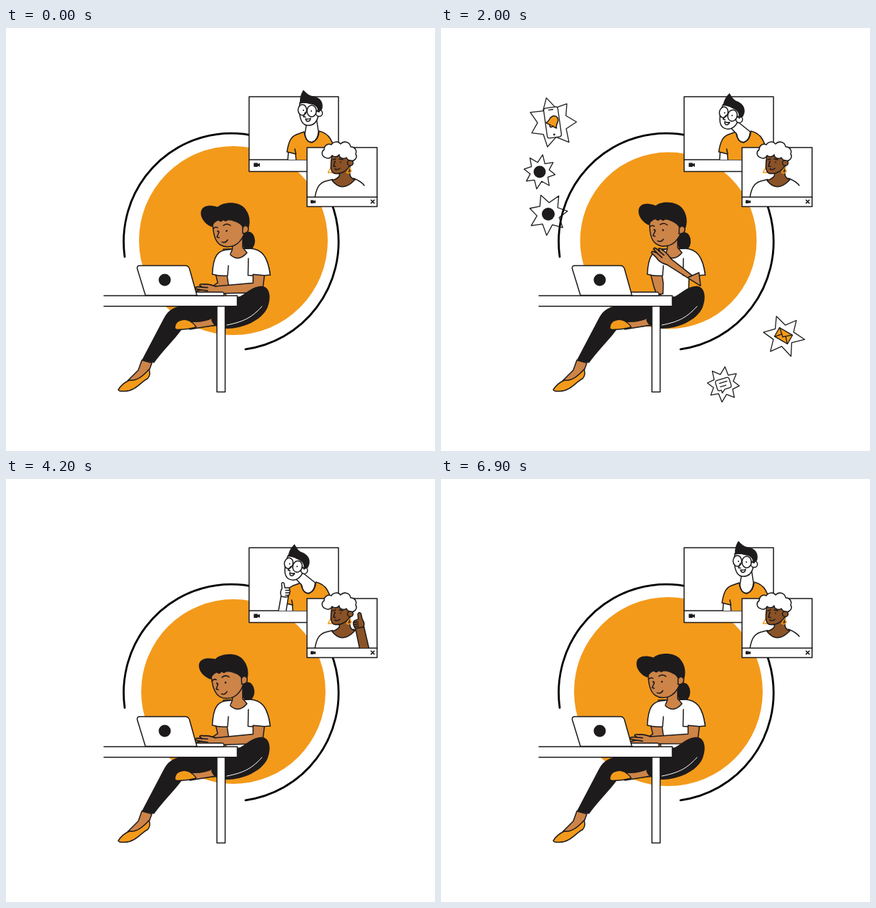
An HTML page for the animation above (7000 ms loop, 600 by 591 pixels).

```html
<!DOCTYPE html>
<html lang="en">
<head>
<meta charset="utf-8">
<title>Video call at the desk</title>
<style>
  html, body { margin: 0; width: 100%; height: 100%; overflow: hidden; background: #fff; }
  svg { display: block; width: 100vw; height: 100vh; }
  .ink { fill: #1d1b1c; stroke: none; }
  .skin { fill: #cd8448; }
  .brown { fill: #8a5227; }
  .orange { fill: #f39a1b; }
  .line { fill: none; }
</style>
</head>
<body>
<svg viewBox="0 0 600 591" fill="#fff" stroke="#1d1b1c" stroke-width="1.5" stroke-linecap="round" stroke-linejoin="round">
  <defs>
    <clipPath id="bigView"><rect x="340" y="80" width="125" height="104"/></clipPath>
    <clipPath id="smallView"><rect x="421" y="150" width="98" height="86"/></clipPath>
  </defs>

  <g id="stars" stroke-width="1.300"></g>
  <circle id="disc" class="orange" cx="318" cy="297" r="132" stroke="none"/>
  <path class="line" d="M166 319.500A150.300 151.500 0 1 1 335 448.800" stroke="#000" stroke-width="2.800"/>

  <!-- large call window -->
  <rect x="340" y="96" width="125" height="104.500"/>
  <path d="M340 184H465"/>
  <path class="ink" d="M346.500 188.500h5.500v1.500l3-1.300v5.200l-3-1.300v1.400h-5.500z"/>
  <g clip-path="url(#bigView)">
    <g id="manBody">
      <path d="M395 172L394 187H407L406 172Z"/>
      <path class="orange" d="M393 173C395 160 398 152 406 149L417 145Q419 160 428 160Q437 157 438 144C451 147 459 156 462 187H406L405 176Z"/>
      <path class="line" d="M405.500 176L404 169"/>
    </g>
    <path id="manNeck"/>
    <g id="manHead">
      <path d="M411 104C409 118 411 135 421 136C430 137 435 131 437 122L440 105Z"/>
      <circle cx="438" cy="119" r="4.600"/>
      <path class="ink" d="M411.500 106C410 98 413 91 416 86.500C420 91 424 94.500 428 95C440 96 445 105 442 114L437 118C436 109 431 107 424 106Q417 103 411.500 106Z"/>
      <ellipse cx="414.500" cy="114.500" rx="6" ry="7.500"/>
      <ellipse cx="427.500" cy="116" rx="6.500" ry="8"/>
      <path class="line" d="M434 116l4 1M418.500 118l-2.500 6 3 .5M419 127q4 1 7-1q-1 5-4.500 4.500q-2-1-2.500-3.500"/>
      <circle class="ink" cx="416" cy="115" r="1"/><circle class="ink" cx="427" cy="116" r="1"/>
    </g>
    <g id="manHand">
      <path stroke="none" d="M380 150L373 190H384L390 152Z"/>
      <path class="line" d="M380 150L373 190M390 152L384 190"/>
      <path d="M380 152C378 147 379 144 381 141L380.500 134Q382 131 384 134L385 140H390Q393 141 391 143.500Q394 145 391 147Q393 149 390 150.500Q390 153 386 153Z"/>
      <path class="line" d="M386 143.500h5M386 147h5M386 150.500h4"/>
    </g>
  </g>

  <!-- small call window -->
  <rect x="421" y="167" width="98" height="82.500"/>
  <path d="M421 236.300H519"/>
  <path class="ink" d="M426 240.500h4.500v1.200l2.500-1v4.200l-2.500-1v1h-4.500z"/>
  <path d="M510.700 240.500l4.200 4.200m0-4.200l-4.200 4.200" stroke-width="1.700"/>
  <g clip-path="url(#smallView)">
    <path class="line" d="M457 211.500L447 214C437 217 434 225 432 237M486 210C494 213 498 216 501 220"/>
    <path class="brown" d="M467 200L466 207Q463 211 456 213Q470 231 488 212Q482 210 481 205V192Z"/>
    <g id="galHead">
      <path class="line" stroke="#f39a1b" d="M455 193L450.500 202H457.500ZM480 194L476.500 202Q481 204 483 200Z"/>
      <path class="brown" d="M456 177C453 195 454 203 461 203.500C470 204 478 199 482 190V176Z"/>
      <circle class="brown" cx="481.500" cy="188.500" r="4"/>
      <path d="M447 181a6 6 0 0 1-2-11a7 7 0 0 1 10-7a8 8 0 0 1 13-1a8 8 0 0 1 14 4a7 7 0 0 1 7 10a6 6 0 0 1-7 9q-4 0-6-4a6 5 0 0 1-10-4a6 5 0 0 1-10 1a6 6 0 0 1-9 3z"/>
      <path class="line" d="M457 184l4-1M466 183l5 1M460 186l-2 7 3 .5M460 197q4 2 7-1"/>
      <circle class="ink" cx="460" cy="187" r=".9"/><circle class="ink" cx="468" cy="187.500" r=".9"/>
    </g>
    <g id="galHand" class="brown">
      <path d="M499 200L501 240H514L511 197Z"/>
      <path d="M499 201C496 196 497 191 500 190L505 189L505.500 182Q508 178 510 182L510.500 190C513 195 512 199 510 201Z"/>
      <path class="line" d="M498 192.500h6M497.500 195.500h6.500M498 198.500h6"/>
    </g>
  </g>

  <!-- woman at the desk -->
  <path class="ink" d="M296 388H246C232 390 225 397 220 407L190 464L207 468C220 450 235 436 246 421L296 416Z"/>
  <path class="skin" d="M190 464L185 478L170 493L182 494L200 479L204 468Z"/>
  <path class="orange" d="M157 505.500C162 497 168 494 173 492C182 494 191 487 200 477Q203 484 198 490C190 493 182 507 166 507.500Q158 508 157 505.500Z"/>
  <path class="skin" d="M252 409Q272 413 291 404L294 415L257 421Z"/>
  <path class="orange" d="M236 419Q236 410 245 408Q252 406 258 410Q264 414 266 418Q256 421 240 421.500Q236 421 236 419Z"/>

  <g id="backHair"><ellipse class="ink" cx="339" cy="297.500" rx="9.300" ry="13"/></g>
  <path d="M304 309L341 308C356 309 366 317 369.500 345L347 346L346 376H308L302 340Z"/>
  <path class="skin" d="M317 298L316.500 309Q315 314 313 316Q325 328 337 314Q334 310 331 307V290Z"/>
  <path id="farArm" class="skin"/>
  <path id="farSleeve" d="M314 309.500C296 309 290 318 288.500 344Q299 347 310 346L311 332"/>
  <path d="M341 308C358 309 366 319 369.500 345Q355 347 338.500 345.500L339 322" stroke-linejoin="miter"/>
  <g id="head">
    <path class="skin" d="M289 268C289 284 291 298 300 303Q308 308 319 304Q328 300 333 288L334 268Z"/>
    <path class="skin" d="M331 279Q335 273 339 279Q340 287 331 287Z"/>
    <path class="ink" d="M288 278C280 275 272 267 272.500 258C273 249 283 246 296 250C303 243 325 241 334 252C341 260 342 271 339.500 279C336 275 334 274 331 279C327 271 319 271 311 267Q308 273 304 268Q301 273 297 269Q291 271 288 278Z"/>
    <path class="line" d="M290 280q3-3 6-1M304 276q5-4 10 0M298 285l-3 7 3 1M302 299q5 2 8-3"/>
    <circle class="ink" cx="296.500" cy="284" r="1.300"/><circle class="ink" cx="308.500" cy="283.500" r="1.300"/>
  </g>
  <path id="nearArm" class="skin"/>
  <g id="hand">
    <path class="skin" d="M-1-4.500C6-7 11-7 15-5L23-4Q25-2 22-1L17 0L24 1.500Q25 4 21 4L16 3.500L19 6Q18 8 14 7C9 8 4 6-1 4.500"/>
    <path class="line" d="M9-1l8 1M9 3l7 .5"/>
  </g>
  <path class="ink" d="M287 408L296 385L323 377C335 372 344 361 357 360.500C368 361 372 374 366 390C358 409 330 420 310 420C298 420 290 417 287 408Z"/>
  <path class="line" d="M309 415C335 410 345 403 358 389" stroke="#fff" stroke-width="1"/>

  <rect x="295" y="388" width="11.500" height="120.500"/>
  <path d="M137 374H323.500V388.800H137"/>
  <path d="M265 369H303Q306 371 304.500 374H265Z"/>
  <path d="M195 373.500L183.500 336Q183 332 187 332H251Q255 332 256.500 336L267 373.500Z"/>
  <circle class="ink" cx="222" cy="352" r="8.500"/>
</svg>

<script>
const LOOP = 7000, STEP = 100, TAU = Math.PI * 2;
const $ = id => document.getElementById(id);
const set = (id, name, value) => $(id).setAttribute(name, value);
const clamp = x => Math.max(0, Math.min(1, x));
const smooth = x => x * x * (3 - 2 * x);
const mix = (a, b, k) => a + (b - a) * k;

// Each key: [time, ...values]; values may be arrays
function at(keys, t) {
  let i = 0;
  while (i < keys.length - 2 && t >= keys[i + 1][0]) i++;
  const a = keys[i], b = keys[i + 1], k = smooth(clamp((t - a[0]) / (b[0] - a[0])));
  return a.slice(1).map((v, j) => Array.isArray(v)
    ? v.map((x, n) => mix(x, b[j + 1][n], k)) : mix(v, b[j + 1], k));
}

// sleeve angle, near elbow, near wrist, hand angle, far elbow, far wrist
const type = [0, 352, 363, 292, 366, 180, 304, 360, 288, 367];
const lift = [0, 352, 363, 295, 364, 186, 303, 358, 290, 362];
const think = [0, 357, 353, 318, 326, 216, 304, 358, 306, 372];
const push = [0, 353, 361, 304, 354, 190, 306, 366, 296, 358];
const reach = [18, 352, 363, 292, 366, 180, 278, 354, 262, 356];
const body = [
  [0, type, 0], [700, type, -4], [1500, lift, -6], [1700, lift, -5], [2000, think, 4],
  [2400, think, 4], [2800, push, 0], [3300, type, -1], [4200, type, -3], [4900, type, -1],
  [5200, reach, 1.5], [5600, reach, 1.5], [6000, type, 2], [6900, type, 1], [7000, type, 0]
];
const lean = [[0, 0], [800, 1], [2450, 1], [2800, .78], [3200, 1], [5550, 1], [6600, 0], [7000, 0]];
const nod = [[0, 0], [2400, 0], [2800, 1], [3300, 0], [7000, 0]];
// x, y and angle offsets of the raised thumbs
const manThumb = [[0, 0, 60], [2400, 0, 60], [2800, 0, 0], [3300, 5, 12], [4500, 5, 12], [5000, 0, 60], [7000, 0, 60]];
const galThumb = [[0, 0, 65, 0], [2400, 0, 65, 0], [2800, 0, 0, 0], [3300, -5, 6, -9], [4500, -5, 6, -9], [5000, 0, 65, 0], [7000, 0, 65, 0]];

// Tapered limb through three joints
function limb(pts, half) {
  const normal = (p, q) => {
    const l = Math.hypot(q[0] - p[0], q[1] - p[1]) || 1;
    return [(q[1] - p[1]) / l, (p[0] - q[0]) / l];
  };
  const n0 = normal(pts[0], pts[1]), n2 = normal(pts[1], pts[2]);
  const sx = n0[0] + n2[0], sy = n0[1] + n2[1], l = Math.hypot(sx, sy) || 1;
  const m = Math.min(1.35, 2 / l);
  const n = [n0, [sx / l * m, sy / l * m], n2];
  const side = s => pts.map((p, i) =>
    `${(p[0] + s * n[i][0] * half[i]).toFixed(2)} ${(p[1] + s * n[i][1] * half[i]).toFixed(2)}`);
  return 'M' + [...side(1), ...side(-1).reverse()].join('L') + 'Z';
}

function burst(n, outer, inner, turn) {
  const pts = [];
  for (let i = 0; i < n * 2; i++) {
    const r = i % 2 ? inner : outer * (.98 + .05 * Math.sin(i * 2.3 + n));
    const a = (turn + i * 180 / n) * Math.PI / 180;
    pts.push(`${(r * Math.cos(a)).toFixed(1)} ${(r * Math.sin(a)).toFixed(1)}`);
  }
  return `<path d="M${pts.join('L')}Z"/>`;
}

// from: resting place, to: place at 2 s, rot: icon angle at 1.5 s and 2 s
const icons = [
  { from: [132, 104], to: [156, 132], rot: [-15, -8], star: [7, 35, 21, -104], art:
    `<rect x="-10" y="-21" width="20" height="42" rx="3"/><path d="M-3-18h6"/><circle cy="17" r="1.400" class="ink"/>
     <g transform="translate(1 -1) rotate(35) scale(1.200)"><path class="orange" d="M-7 5Q-5 3-5-2Q-4-7 0-7Q4-7 5-2Q5 3 7 5Z"/><path class="orange" d="M-2 5q2 4 4 0"/></g>` },
  { from: [40, 149], to: [138, 201], rot: [0, 0], star: [8, 23.5, 13.5, -80], art: '<circle class="ink" r="8.500"/>' },
  { from: [72, 236], to: [150, 260], rot: [0, 0], star: [7, 29, 16, -60], art: '<circle class="ink" r="9"/>' },
  { from: [525, 482], to: [479, 430], rot: [14, 30], star: [6, 30, 15, -110], art:
    '<rect class="orange" x="-10.500" y="-7" width="21" height="14"/><path class="line" d="M-10-7L0 2L10-7M-10 7L-3-1M10 7L3-1"/>' },
  { from: [413, 534], to: [395, 498], rot: [0, -17], star: [8, 24, 14.5, -85], art:
    '<path d="M-7-8H7Q10-8 10-5V4Q10 7 7 7H0L-5 11V7H-7Q-10 7-10 4V-5Q-10-8-7-8Z"/><path d="M-5-3H6M-5 2H3"/>' }
];
$('stars').innerHTML = icons.map((s, i) =>
  `<g id="star${i}">${burst(...s.star)}<g id="icon${i}">${s.art}</g></g>`).join('');

function drawStars(t) {
  const go = Math.pow(Math.max(0, t - 1600) / 400, 1.5);
  const fade = 1 - smooth(clamp((t - 2150) / 350));
  icons.forEach((s, i) => {
    const pop = clamp((t - 850 - i * 50) / 350);
    const scale = (smooth(pop) + .2 * Math.sin(pop * Math.PI) * pop) * fade;
    const [x, y] = s.from.map((v, n) => mix(v, s.to[n], go));
    set('star' + i, 'visibility', scale > .01 ? 'visible' : 'hidden');
    set('star' + i, 'transform', `translate(${x} ${y}) scale(${scale})`);
    set('icon' + i, 'transform', `rotate(${mix(s.rot[0], s.rot[1], (t - 1500) / 500)})`);
  });
}

function drawWorker(t) {
  const [p, tilt] = at(body, t);
  const [sleeve, ex, ey, wx, wy, hand, fx, fy, gx, gy] = p;
  const tap = 1.1 * Math.sin(TAU * t / 500);
  const a = sleeve * Math.PI / 180;
  const cuff = [308 - 8 * Math.cos(a) - 20 * Math.sin(a), 318 + 20 * Math.cos(a) - 8 * Math.sin(a)];
  set('farArm', 'd', limb([cuff, [fx, fy], [gx, gy - tap]], [8, 7, 4.5]));
  set('farSleeve', 'transform', `rotate(${sleeve} 308 318)`);
  set('nearArm', 'd', limb([[353.5, 345], [ex, ey], [wx, wy + tap]], [8, 7, 5]));
  set('hand', 'transform', `translate(${wx} ${wy + tap}) rotate(${hand}) scale(1.12)`);
  for (const id of ['head', 'backHair']) set(id, 'transform', `rotate(${tilt} 325 312)`);
}

function drawCallers(t) {
  const [k] = at(lean, t), [n] = at(nod, t);
  const hx = -19.5 * k, hy = 5.5 * k, bx = -4.5 * k;
  set('manHead', 'transform', `translate(${hx} ${hy}) rotate(${14 * k} 424 115)`);
  set('manBody', 'transform', `translate(${bx} 0)`);
  set('manNeck', 'd', `M${421 + hx} ${130 + hy}L${418 + bx} 148Q${420 + bx} 160 ${428 + bx} 159.500Q${436 + bx} 157 ${437 + bx} 145L${434 + hx} ${125 + hy}`);
  set('galHead', 'transform', `translate(${6 * n} 0) rotate(${5 * n} 468 195)`);
  const [mx, my] = at(manThumb, t), [gx, gy, ga] = at(galThumb, t);
  set('manHand', 'transform', `translate(${mx} ${my})`);
  set('galHand', 'transform', `translate(${gx} ${gy}) rotate(${ga} 507 236)`);
}

const start = performance.now();
function tick(now) {
  const t = Math.floor(Math.max(0, now - start) % LOOP / STEP) * STEP;
  set('disc', 'r', 127.5 + 4.5 * Math.cos(TAU * t / 3500));
  drawStars(t);
  drawWorker(t);
  drawCallers(t);
  requestAnimationFrame(tick);
}
tick(start);
</script>
</body>
</html>
```
